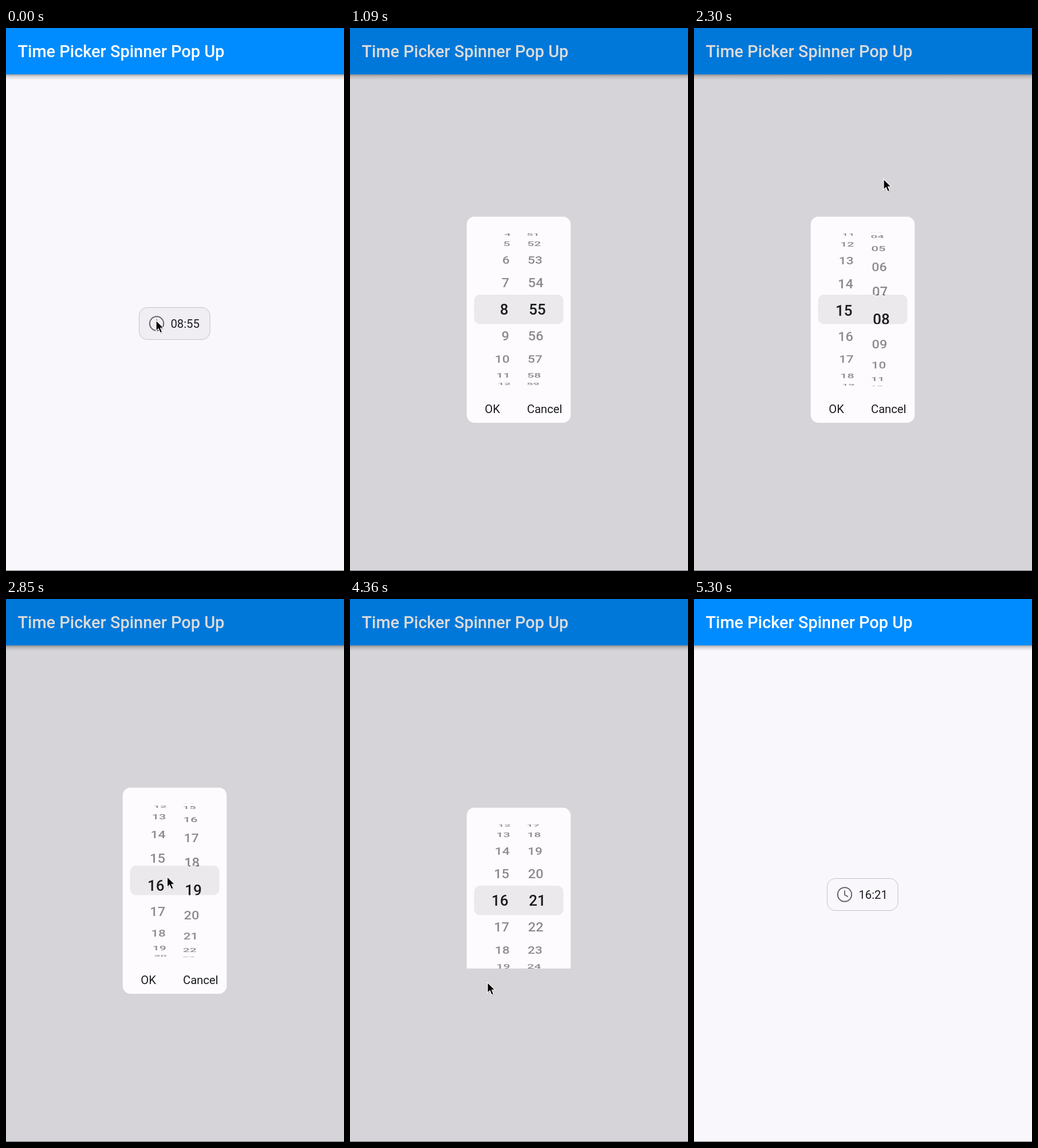
Recreate the animation shown at these times as an HTML page. Size 590x949 px, loop 5820 ms.

```html
<!DOCTYPE html>
<html lang="en">
<head>
<meta charset="utf-8">
<title>Time Picker Spinner Pop Up</title>
<style>
html, body { margin: 0; width: 100%; height: 100%; overflow: hidden; background: #f9f7fb; }
svg { display: block; width: 590px; height: 949px; font-family: Roboto, sans-serif; }
.rows text { font-size: 24px; font-weight: 500; fill: #1b1b1f; }
.label { font-size: 20.2px; fill: #1b1b1f; }
</style>
</head>
<body>
<svg viewBox="0 0 590 949">
  <defs>
    <linearGradient id="shade" x2="0" y2="1">
      <stop offset="0" stop-color="#000" stop-opacity=".34"/>
      <stop offset=".4" stop-color="#000" stop-opacity=".12"/>
      <stop offset="1" stop-color="#000" stop-opacity="0"/>
    </linearGradient>
    <clipPath id="reveal"><rect id="window" x="200" width="190"/></clipPath>
    <clipPath id="outside"><path d="M204 357H385V466H204ZM204 517.5H385V627H204Z"/></clipPath>
    <clipPath id="inside"><rect x="204" y="466" width="181" height="51.5"/></clipPath>
  </defs>

  <rect width="590" height="949" fill="#f9f7fb"/>
  <rect y="81" width="590" height="10" fill="url(#shade)"/>
  <rect width="590" height="81" fill="#008cfe"/>
  <text x="20.5" y="51" font-size="28.9" font-weight="500" fill="#fff">Time Picker Spinner Pop Up</text>

  <rect id="press" x="232.5" y="488.5" width="123.5" height="56" rx="14" fill="#000"/>
  <rect x="232.5" y="488.5" width="123.5" height="56" rx="14" fill="none" stroke="#c2c1c6"/>
  <g fill="none" stroke="#636367" stroke-width="2">
    <circle cx="263" cy="516.5" r="12.2"/>
    <path d="M263 509.3V517L268.8 520.4" stroke-width="1.8"/>
  </g>
  <text id="value" class="label" x="287.5" y="524"></text>

  <rect id="scrim" width="590" height="949"/>

  <g clip-path="url(#reveal)">
    <g id="popup">
      <rect x="203.7" y="329.5" width="181.5" height="360.5" rx="14" fill="#fefbff"/>
      <rect x="216.7" y="466" width="155.8" height="51.5" rx="10" fill="#ebe9ec"/>
      <g clip-path="url(#outside)"><g id="far" class="rows" opacity=".5"></g></g>
      <g clip-path="url(#inside)"><g id="near" class="rows"></g></g>
      <text class="label" x="235.3" y="673.3">OK</text>
      <text class="label" x="309" y="673.3">Cancel</text>
    </g>
  </g>

  <rect y="948" width="590" height="1" fill="#67666a"/>
  <g id="cursor">
    <path d="M1 1.5V20L5.2 16.1L8.2 23.3L11.6 21.8L8.6 14.8H14.2Z" fill="#000" opacity=".2"/>
    <path d="M0 0V18.5L4.2 14.6L7.2 21.8L10.6 20.3L7.6 13.3H13.2Z" stroke="#fff" stroke-width="1.2"/>
  </g>
</svg>
<script>
const LOOP = 5820, CX = 294.4, CY = 492;
const RADIUS = 164, STEP = 0.29, LENS = 1.08, POOL = 11;
const $ = id => document.getElementById(id);
const clamp = (v, a = 0, b = 1) => Math.min(b, Math.max(a, v));
const span = (t, a, b) => clamp((t - a) / (b - a));
const smooth = x => x * x * (3 - 2 * x);
const easeOut = x => 1 - (1 - x) ** 3;

const columns = [
  { count: 24, pad: 1, x: -16.6, anchor: "end" },
  { count: 60, pad: 2, x: 16.6, anchor: "start" }
];

function makeRows(layer, { x, anchor }) {
  return Array.from({ length: POOL }, () => {
    const el = document.createElementNS("http://www.w3.org/2000/svg", "text");
    el.setAttribute("x", x);
    el.setAttribute("y", 8.5);
    el.setAttribute("text-anchor", anchor);
    layer.append(el);
    return el;
  });
}

for (const c of columns) c.layers = [makeRows($("far"), c), makeRows($("near"), c)];
$("near").setAttribute("transform",
  `translate(${CX} ${CY}) scale(${LENS}) translate(${-CX} ${-CY})`);

// Rows sit on a cylinder seen with a little perspective.
function drawWheel(col, pos) {
  const first = Math.round(pos) - (POOL >> 1);
  for (let i = 0; i < POOL; i++) {
    const n = first + i, angle = (n - pos) * STEP;
    const s = Math.sin(angle), c = Math.cos(angle);
    const depth = 1 + 0.25 * (1 - c);
    const y = RADIUS * s / depth;
    const sy = (c * depth - 0.25 * s * s) / depth ** 2;
    const sx = 1 / (1 + 0.34 * (1 - c));
    const shown = Math.abs(angle) < 1.36 && sy > 0.01;
    const text = String((n + col.count) % col.count).padStart(col.pad, "0");
    for (const rows of col.layers) {
      const el = rows[i];
      el.setAttribute("visibility", shown ? "inherit" : "hidden");
      if (!shown) continue;
      el.textContent = text;
      el.setAttribute("transform", `translate(${CX} ${CY + y}) scale(${sx} ${sy})`);
    }
  }
}

// A fling slowing down towards its end row.
const fling = (t, from, to, ref, rest, tau) =>
  clamp(to + 0.05 - rest * Math.exp((ref - t) / tau), from, to);

const hourAt = t => fling(t, 8, 16, 1640, 7.12, 350);
const minuteAt = t => fling(t, 55, 81, 2300, 13.42, 319);

const path = [
  [0, 262, 511], [180, 262, 511],
  [1380, 282, 480], [1450, 284, 474], [1640, 313, 384], [1780, 318, 350],
  [2030, 322, 470], [2300, 331, 264], [2480, 331, 264],
  [3180, 240, 670], [LOOP, 240, 670]
];

function cursorAt(t) {
  const k = path.findIndex(p => p[0] > t);
  const [t0, x0, y0] = path[k - 1], [t1, x1, y1] = path[k];
  const e = smooth(span(t, t0, t1));
  return [x0 + (x1 - x0) * e, y0 + (y1 - y0) * e];
}

const cursorShown = t => t < 180 || (t >= 1380 && t < 4560);

function openness(t) {
  if (t < 4355) return easeOut(span(t, 50, 310));
  return 0.78 * (1 - smooth(span(t, 4360, 4600)));
}

const scrimAt = t => 0.14 * smooth(span(t, 30, 270)) * (1 - smooth(span(t, 4360, 4660)));

function draw(t) {
  const p = openness(t), drop = (1 - p) * 159;
  $("popup").setAttribute("transform", `translate(0 ${drop})`);
  $("popup").setAttribute("visibility", p > 0.001 ? "visible" : "hidden");
  $("window").setAttribute("y", 329.5 + drop);
  $("window").setAttribute("height", 360.5 * p);
  $("scrim").setAttribute("opacity", scrimAt(t));
  $("press").setAttribute("opacity", 0.035 * (1 - span(t, 120, 320)));
  $("value").textContent = t < 4355 ? "08:55" : "16:21";

  drawWheel(columns[0], hourAt(t));
  drawWheel(columns[1], minuteAt(t));

  const [x, y] = cursorAt(t);
  $("cursor").setAttribute("transform", `translate(${x} ${y})`);
  $("cursor").setAttribute("visibility", cursorShown(t) ? "visible" : "hidden");
}

function tick() {
  draw(performance.now() % LOOP);
  requestAnimationFrame(tick);
}
tick();
</script>
</body>
</html>
```
